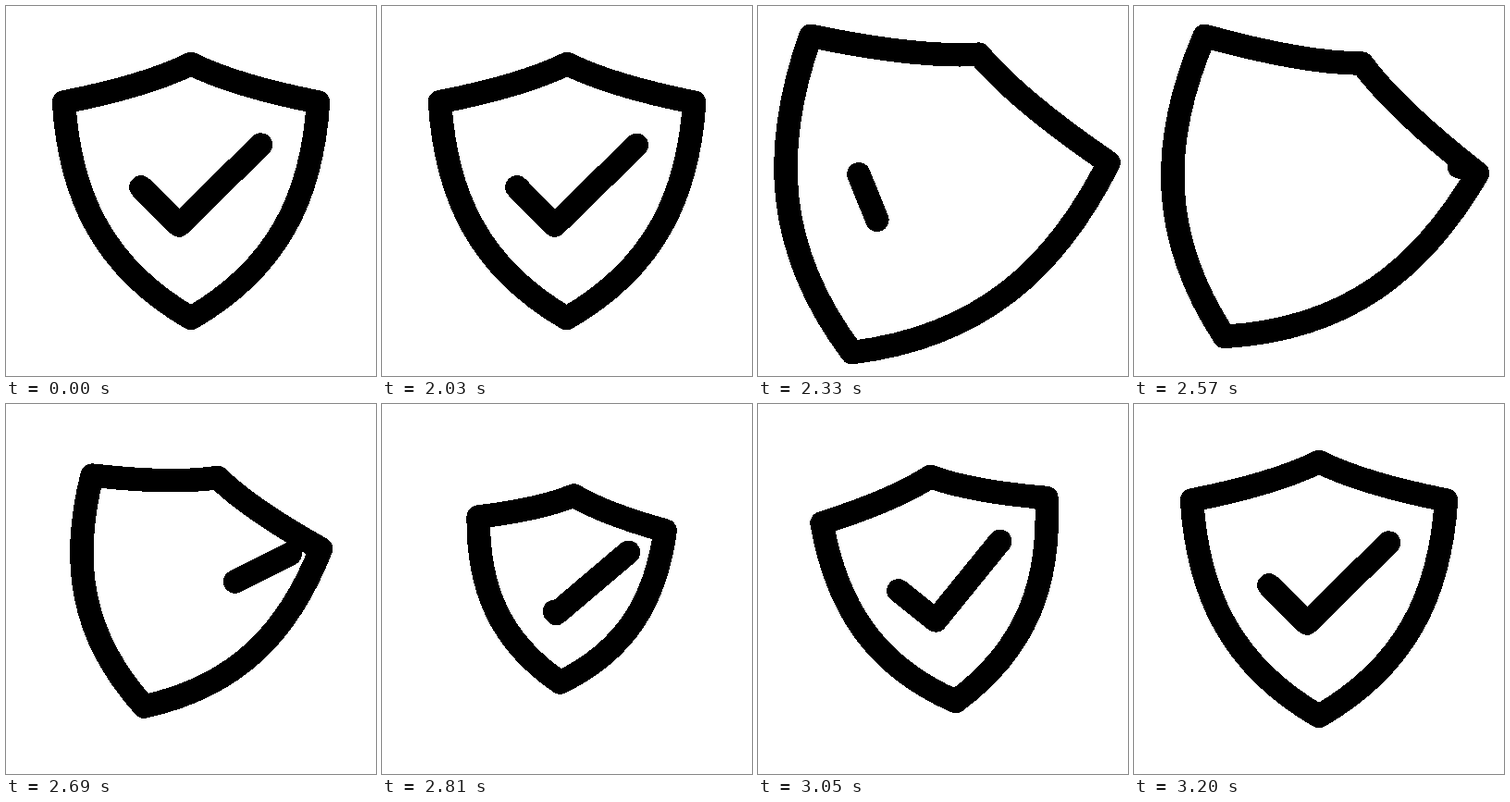
These frames come from a looping animation (400x400 px, 3.23 s). An HTML page:

```html
<!DOCTYPE html>
<html lang="en">
<head>
<meta charset="utf-8">
<title>Shield check</title>
<style>
  html, body { margin: 0; width: 100%; height: 100%; overflow: hidden; background: #fff; }
  svg { display: block; }
  path { fill: none; stroke: #000; stroke-width: 25.5; stroke-linecap: round; stroke-linejoin: round;
         vector-effect: non-scaling-stroke; shape-rendering: crispEdges; }
</style>
</head>
<body>
<svg width="400" height="400">
  <g id="badge">
    <path d="M-137.5-96Q-47-114 0-137.5Q47-114 137.5-96C131 5 95 82.5 0 137.5C-95 82.5-131 5-137.5-96Z"/>
    <path id="check"/>
  </g>
</svg>
<script>
const LOOP = 3230, START = 2000, STEP = 30;
const badge = document.getElementById('badge');
const check = document.getElementById('check');

const smooth = u => u * u * (3 - 2 * u);

// cubic-bezier(1/3, 0, 1/3, 1): quick start, long settle
function settle(u) {
  let lo = 0, hi = 1;
  for (let i = 0; i < 20; i++) {
    const m = (lo + hi) / 2;
    if (m - m * m + m * m * m < u) lo = m; else hi = m;
  }
  return smooth(lo);
}

// keys: [time, value, easing towards this key]
function track(t, keys) {
  if (t <= keys[0][0]) return keys[0][1];
  for (let i = 1; i < keys.length; i++) {
    const [t0, v0] = keys[i - 1], [t1, v1, ease] = keys[i];
    if (t < t1) return v0 + (v1 - v0) * ease((t - t0) / (t1 - t0));
  }
  return keys[keys.length - 1][1];
}

const angle = [[10, 0], [535, 27.3, settle], [990, -8, smooth], [1200, 0, smooth]];
const scale = [[20, 1], [420, 1.287, settle], [480, 1.287, smooth], [850, 0.718, smooth], [1200, 1, smooth]];
const shiftX = [[20, 0], [390, -30.5, settle], [520, -30.5, smooth], [805, 0, smooth]];
const shiftY = [[20, 0], [390, 13.7, settle], [440, 13.7, smooth], [805, 0, smooth]];

// The tick as a line measured by length; its long arm can run past the tip
const BEND = 58, TIP = 182, FAR = 251;
const erase = [[20, TIP], [470, 0, smooth]];
const head = [[525, FAR], [1040, 0, settle]];
const tail = [[525, FAR], [1040, TIP, settle]];

const pointAt = s => s < BEND
  ? [-54 + 0.707 * s, -4 + 0.707 * s]
  : [-13 + 0.713 * (s - BEND), 37 - 0.701 * (s - BEND)];

function tick(a, b) {
  if (b - a < 0.01) return '';
  const stops = a < BEND && BEND < b ? [a, BEND, b] : [a, b];
  return 'M' + stops.map(pointAt).join('L');
}

function draw(t) {
  const x = 200 + track(t, shiftX), y = 200 + track(t, shiftY);
  badge.setAttribute('transform',
    `translate(${x} ${y}) rotate(${track(t, angle)}) scale(${track(t, scale)})`);
  check.setAttribute('d', t < 490
    ? tick(0, track(t, erase))
    : tick(track(t, head), track(t, tail)));
}

function frame() {
  const t = performance.now() % LOOP - START;
  draw(Math.max(0, Math.floor(t / STEP) * STEP));
  requestAnimationFrame(frame);
}
frame();
</script>
</body>
</html>
```
